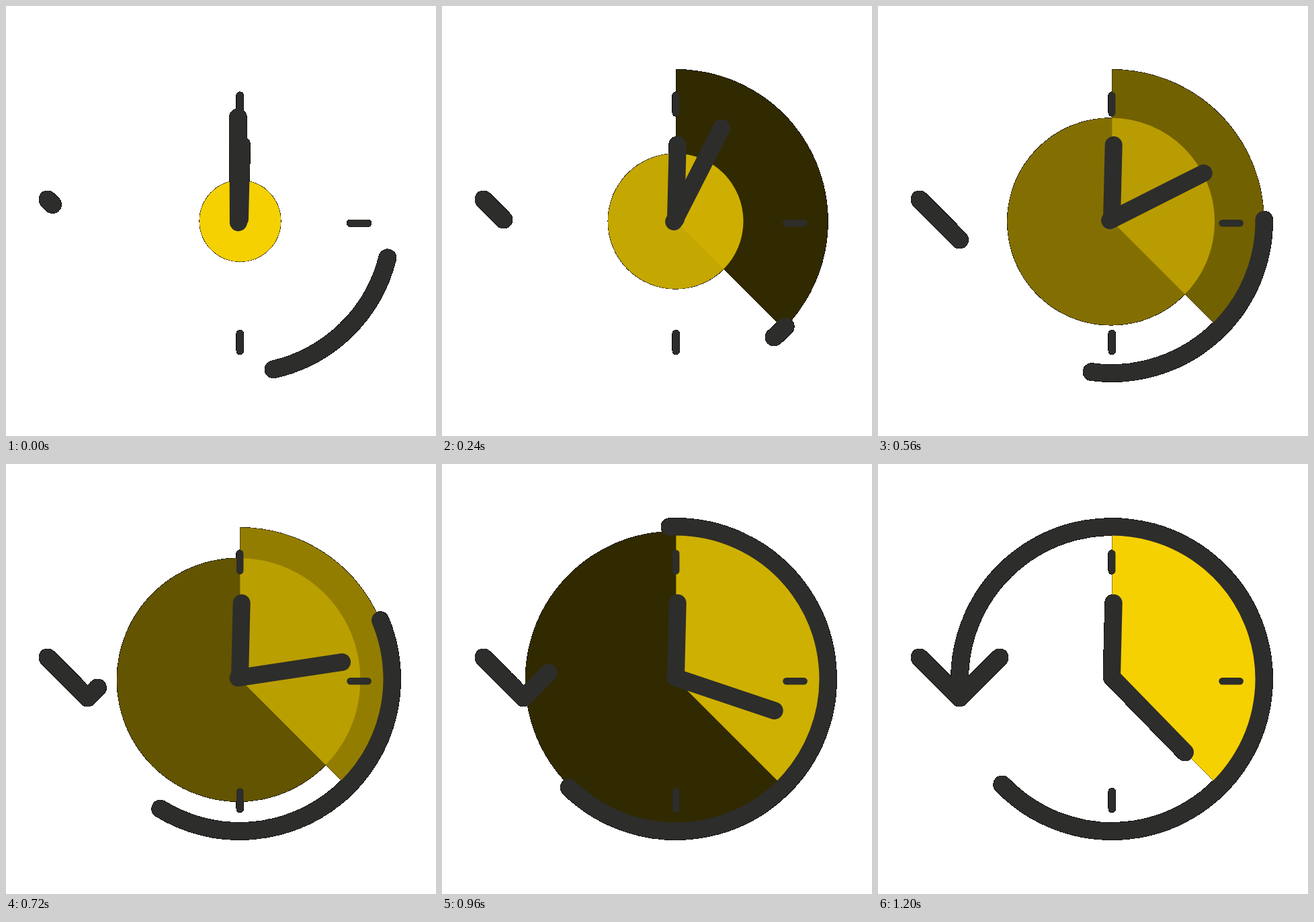
Recreate the animation shown at these times as an HTML page. Size 640 by 640 pixels, loop 2.08 s.

```html
<!DOCTYPE html>
<html lang="en">
<head>
<meta charset="utf-8">
<title>Clock</title>
<style>
  html, body { margin: 0; width: 100%; height: 100%; overflow: hidden; background: #fff; }
  svg { display: block; width: 100vw; height: 100vh; }
  .line { fill: none; stroke: #2d2d2b; stroke-width: 26; stroke-linecap: round; stroke-linejoin: round; }
  .tick { stroke-width: 10.5; }
  .fill { fill: #f5d102; }
</style>
</head>
<body>
<svg viewBox="0 0 640 640">
  <defs>
    <!-- Puts opaque black behind every pixel that is not fully clear -->
    <filter id="matte" filterUnits="userSpaceOnUse" x="0" y="0" width="640" height="640" color-interpolation-filters="sRGB">
      <feColorMatrix in="SourceGraphic" values="0 0 0 0 0  0 0 0 0 0  0 0 0 0 0  0 0 0 255 0" result="back"/>
      <feMerge>
        <feMergeNode in="back"/>
        <feMergeNode in="SourceGraphic"/>
      </feMerge>
    </filter>
  </defs>
  <g filter="url(#matte)">
    <path id="wedge" class="fill"/>
    <circle id="disc" class="fill"/>
    <path class="line tick" d="M348.2 133V159M348.2 487.5V513.5M512.5 323.2H538.7"/>
    <path id="ring" class="line"/>
    <path id="arrow" class="line"/>
    <path class="line" d="M350.7 207L348 317"/>
    <path id="hand" class="line" d="M348 317L457 429"/>
  </g>
</svg>
<script>
  const STEP = 80, LAST = 15, LOOP = 2080;
  const CX = 348, CY = 320;
  const el = id => document.getElementById(id);
  const lerp = (a, b, t) => a + (b - a) * t;

  function set(id, attrs) {
    for (const name in attrs) el(id).setAttribute(name, attrs[name]);
  }

  // Angles in degrees, clockwise from the right
  function arc(cx, cy, r, a, b) {
    const at = deg => {
      const rad = deg * Math.PI / 180;
      return `${cx + r * Math.cos(rad)} ${cy + r * Math.sin(rad)}`;
    };
    return `M${at(a)}A${r} ${r} 0 ${b - a > 180 ? 1 : 0} 1 ${at(b)}`;
  }

  // Linear to a middle value at two thirds, then linear to the end
  function twoPart(k, a, mid, b) {
    return k < 10 ? lerp(a, mid, k / 10) : lerp(mid, b, (k - 10) / 5);
  }

  function arrowPath(p) {
    const start = "M62 288L";
    if (p <= 0.5) return `${start}${lerp(62, 121.5, p * 2)} ${lerp(288, 348, p * 2)}`;
    const q = p * 2 - 1;
    return `${start}121.5 348L${lerp(121.5, 181, q)} ${lerp(348, 288, q)}`;
  }

  function draw(time) {
    const k = Math.min(LAST, Math.floor(time % LOOP / STEP));
    const p = k / LAST;

    set("wedge", { opacity: p });
    set("disc", {
      cx: 348.5 - 0.25 * k,
      cy: 320 + 0.13 * k,
      r: 60.6 + 13.4 * k,
      opacity: 1 - p
    });

    // The two ends start crossed and pass each other
    const a = twoPart(k, 14, 133.4, 136.1);
    const b = twoPart(k, 77.2, -33.8, -180);
    set("ring", { d: arc(CX, CY, 226.5, Math.min(a, b), Math.max(a, b)) });

    set("arrow", { d: arrowPath((k + 1) / (LAST + 1)) });
    set("hand", { transform: `rotate(${136 * (p - 1)} ${CX} ${CY})` });
  }

  set("wedge", { d: arc(348.4, 320.4, 226, -90, 45) + "L348.4 320.4Z" });

  const begin = performance.now();
  function tick() {
    draw(performance.now() - begin);
    requestAnimationFrame(tick);
  }
  draw(0);
  requestAnimationFrame(tick);
</script>
</body>
</html>
```
